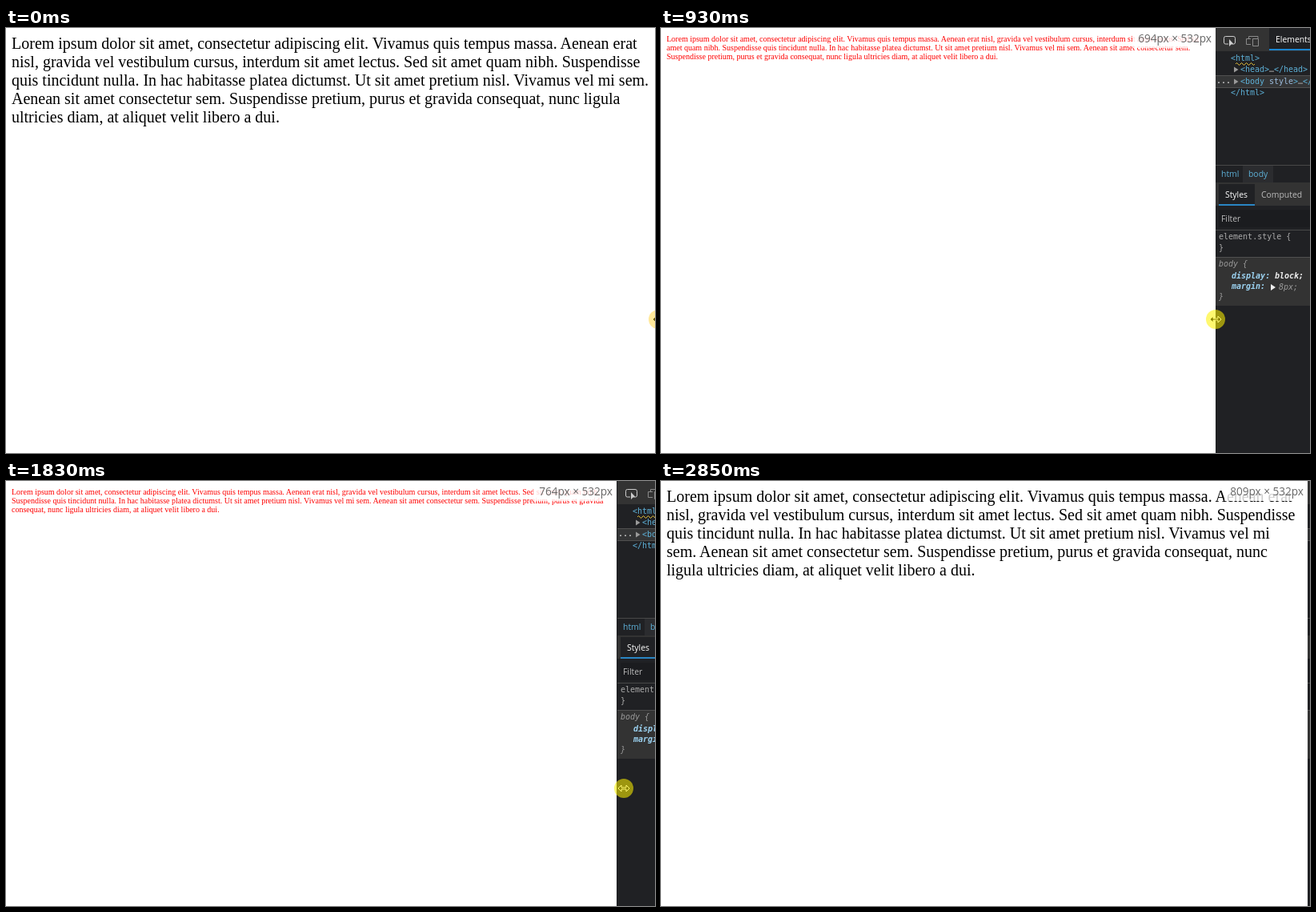
Write an HTML page that moves like this. It is 811x531 px and loops after 3.45 s.

```html
<!DOCTYPE html>
<html lang="en">
<head>
<meta charset="utf-8">
<title>Responsive text</title>
<style>
html, body { margin: 0; width: 100%; height: 100%; overflow: hidden; background: #202124; }
#stage { position: relative; width: 811px; height: 531px; overflow: hidden; }
#stage div, #panel span, svg { position: absolute; box-sizing: border-box; }
#page { left: 0; top: 0; height: 531px; padding: 8px 8.5px 0 7px; background: #fff; color: #000;
  font: 20px "Liberation Serif", serif; }
#page.small { color: #f00; font-size: 10px; }
#size { top: 0; width: 104px; height: 25px; padding-right: 5px; text-align: right; white-space: nowrap;
  background: rgba(255,255,255,.8); color: #666; font: 13.6px/26px "Open Sans", sans-serif; }
#panel { top: 0; width: 260px; height: 531px; overflow: hidden; background: #202124; }
#panel span { line-height: 14px; white-space: pre; }
.ui { font: 10.4px "Open Sans", sans-serif; color: #bbb; }
.code { font: 10px "DejaVu Sans Mono", monospace; color: #aaa; }
#panel .on { color: #fff; }
#panel .link { color: #5db0d7; }
#panel .attr { color: #9bbbdc; }
#panel .dim { color: #999; font-style: italic; }
#panel .prop { color: #9cd3f2; font-weight: bold; font-style: italic; }
#panel .value { color: #eee; font-weight: bold; font-style: italic; }
svg { left: 0; top: 0; overflow: visible; }
</style>
</head>
<body>
<div id="stage">
  <div id="panel"></div>
  <div id="page">Lorem ipsum dolor sit amet, consectetur adipiscing elit. Vivamus quis tempus massa. Aenean erat nisl, gravida vel vestibulum cursus, interdum sit amet lectus. Sed sit amet quam nibh. Suspendisse quis tincidunt nulla. In hac habitasse platea dictumst. Ut sit amet pretium nisl. Vivamus vel mi sem. Aenean sit amet consectetur sem. Suspendisse pretium, purus et gravida consequat, nunc ligula ultricies diam, at aliquet velit libero a dui.</div>
  <div id="size"></div>
  <svg id="cursor" width="1" height="1">
    <path id="arrows" d="M-7 0L-3 -4V-1H3V-4L7 0L3 4V1H-3V4Z" stroke="#fff"/>
    <circle r="12"/>
  </svg>
</div>
<script>
const $ = id => document.getElementById(id);
const panel = $('panel'), page = $('page'), size = $('size'), cursor = $('cursor'), arrows = $('arrows');
const dot = cursor.querySelector('circle');

function bar(x, y, w, h, color) {
  const el = document.createElement('div');
  el.style.cssText = `left:${x}px;top:${y}px;width:${w}px;height:${h}px;background:${color}`;
  panel.append(el);
}
function label(x, y, text, cls) {
  const el = document.createElement('span');
  el.className = cls;
  el.textContent = text;
  el.style.cssText = `left:${x}px;top:${y - 7}px;line-height:14px`;
  panel.append(el);
}

// Developer tools panel
bar(0, 0, 260, 29, '#333');
bar(67, 0, 60, 28, '#202124');
bar(67, 26, 60, 2, '#1a85d0');
bar(0, 59, 260, 16, '#343536');
bar(0, 59, 260, 1, '#505050');
bar(0, 74, 260, 1, '#505050');
bar(0, 171, 260, 1, '#484848');
bar(34, 172, 38, 21, '#2b2c2f');
bar(0, 193, 260, 29, '#333');
bar(4, 195, 45, 27, '#202124');
bar(4, 220, 45, 2, '#2a86c4');
bar(4, 227, 250, 22, '#1b1c1f');
bar(0, 252, 260, 1, '#484848');
bar(0, 286, 260, 61, '#333');
bar(0, 286, 260, 1, '#505050');
panel.insertAdjacentHTML('beforeend', `<svg width="260" height="531" fill="none">
  <path d="M16 20H12.5Q10.500 20 10.500 18V12.500Q10.500 10.500 12.500 10.500H22Q24.500 10.500 24.500 12.500V18Q24.500 20 22.500 20" stroke="#ccc"/>
  <path d="M17 14V23L19.500 20.500H23Z" fill="#ccc"/>
  <path d="M41.500 13V10.500H53V13M44 20.500H38.500V13.500H44M46.500 13.500H53.500V22.500H46.500Z" stroke="#8a8a8a"/>
  <path d="M25 45${'q1.500 -3 3 0t3 0'.repeat(4)}" stroke="#e8c33c"/>
  <path d="M23 48.500L28.500 52L23 55.500ZM23 63.500L28.500 67L23 70.500Z" fill="#999"/>
  <path d="M69 320L75 324L69 328Z" fill="#eee"/></svg>`);
[
  [75, 14, 'Elements', 'ui on'],
  [19, 38, '<html>', 'code link'],
  [31, 52, '<head>', 'code link'], [67, 52, '…', 'code'], [73, 52, '</head>', 'code link'],
  [1, 66, '...', 'code on'],
  [31, 67, '<body', 'code link'], [67, 67, 'style', 'code attr'], [97, 67, '>', 'code link'],
  [103, 67, '…', 'code'], [109, 67, '</body>', 'code link'],
  [19, 81, '</html>', 'code link'],
  [7, 182, 'html', 'ui link'], [41, 182, 'body', 'ui link'],
  [12, 208, 'Styles', 'ui on'], [57, 208, 'Computed', 'ui'],
  [7, 238, 'Filter', 'ui'],
  [4, 261, 'element.style {', 'code'], [4, 275, '}', 'code'],
  [4, 295, 'body {', 'code dim'],
  [20, 310, 'display:', 'code prop'], [74, 310, 'block;', 'code value'],
  [20, 323, 'margin:', 'code prop'], [79, 324, '8px;', 'code dim'],
  [4, 336, '}', 'code dim']
].forEach(row => label(...row));

const LOOP = 3450;
// time, page width, panel x, cursor x, cursor y
const keys = [
  [0, 822, 821, 815, 364],
  [130, 813, 812, 813, 364],
  [400, 801, 800, 801, 364],
  [600, 782, 776, 770, 364],
  [730, 751, 740, 732, 364],
  [870, 706, 700, 697, 364],
  [930, 694, 693, 693, 364],
  [1080, 690, 689, 693, 365],
  [1280, 690, 689, 693, 365],
  [1420, 696, 695, 702, 368],
  [1760, 753, 752, 763, 382],
  [1830, 764, 764, 772, 384],
  [2040, 784, 783, 791, 387],
  [2310, 798, 797, 803, 389],
  [2510, 809, 808, 814, 389],
  [2700, 809, 808, 814, 389],
  [2710, 809, 808, 790, 412],
  [2780, 809, 808, 770, 450],
  [LOOP, 809, 808, 770, 450]
];

function snap(t) {
  const step = (start, length, last) => start + length * Math.min(last, Math.floor((t - start + 6) / length));
  if (t < 130) return 0;
  if (t < 1080) return step(130, 67, 12);
  if (t < 1280) return 1080;
  if (t < 2710) return step(1280, 68.6, 18);
  return step(2710, 70, 2);
}

function pose(t) {
  const i = keys.findIndex(k => k[0] > t), a = keys[i - 1], b = keys[i];
  const f = (t - a[0]) / (b[0] - a[0]);
  return a.slice(1).map((v, n) => Math.round(v + (b[n + 1] - v) * f));
}

function draw(now) {
  const time = now % LOOP, t = snap(time);
  const [width, panelX, x, y] = pose(t);
  page.style.width = width - 1 + 'px';
  page.className = width <= 800 ? 'small' : '';
  panel.style.left = panelX + 'px';
  size.hidden = time < 130;
  size.style.left = width - 105 + 'px';
  size.textContent = `${width}px × 532px`;
  cursor.style.display = time >= 2850 ? 'none' : '';
  cursor.style.transform = `translate(${x}px,${y}px)`;
  arrows.style.display = time >= 2710 ? 'none' : '';
  dot.setAttribute('fill', time < 130 || time >= 2710 ? 'rgba(255,205,30,.45)'
    : time < 470 ? 'rgba(255,220,10,.6)' : 'rgba(255,242,0,.56)');
  requestAnimationFrame(() => draw(performance.now() - start));
}
const start = performance.now();
draw(0);
</script>
</body>
</html>
```
